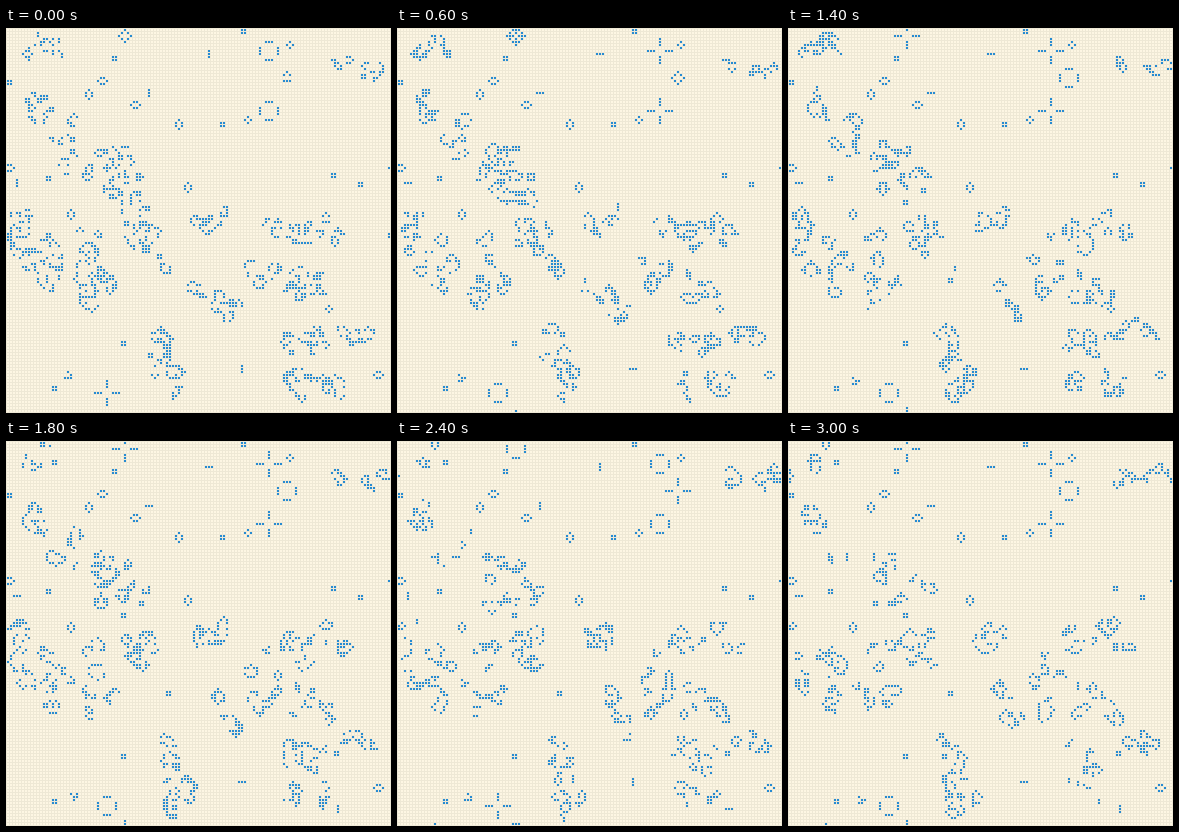
An HTML page with a canvas for the animation above (3.2 s loop, 385 by 385 pixels).

```html
<!DOCTYPE html>
<html lang="en">
<head>
<meta charset="utf-8">
<title>Game of Life</title>
<style>
  html, body { margin: 0; width: 100%; height: 100%; overflow: hidden; background: #fdf6e3; }
  canvas { display: block; width: 385px; height: 385px; }
</style>
</head>
<body>
<canvas id="board" width="385" height="385"></canvas>
<script>
const SIZE = 128, PITCH = 3, EDGE = SIZE * PITCH + 1;
const STEP = 200, STEPS = 16;
const PAPER = '#fdf6e3', LINE = '#eee8d5', LIVE = '#268bd2';
const ctx = document.getElementById('board').getContext('2d');

const wrap = n => (n + SIZE) % SIZE;
const at = (x, y) => wrap(y) * SIZE + wrap(x);

function randomFrom(seed) {
  return () => {
    seed = (Math.imul(seed, 1664525) + 1013904223) >>> 0;
    return seed / 4294967296;
  };
}
const random = randomFrom(71);

function evolve(cells) {
  return cells.map((alive, i) => {
    const x = i % SIZE, y = Math.floor(i / SIZE);
    let sum = -alive;
    for (let dy = -1; dy <= 1; dy++)
      for (let dx = -1; dx <= 1; dx++) sum += cells[at(x + dx, y + dy)];
    return sum === 3 || (alive && sum === 2) ? 1 : 0;
  });
}

// Random cells within r of the line from (x1, y1) to (x2, y2).
function trail(cells, x1, y1, x2, y2, r) {
  const vx = x2 - x1, vy = y2 - y1, len2 = vx * vx + vy * vy;
  for (let y = Math.min(y1, y2) - r; y <= Math.max(y1, y2) + r; y++)
    for (let x = Math.min(x1, x2) - r; x <= Math.max(x1, x2) + r; x++) {
      const k = Math.max(0, Math.min(1, ((x - x1) * vx + (y - y1) * vy) / len2));
      const away = Math.hypot(x - x1 - k * vx, y - y1 - k * vy);
      if (away <= r && random() < 0.36) cells[at(x, y)] = 1;
    }
}

// Writes a small pattern with an empty margin around it.
function stamp(cells, shape, ...spots) {
  const rows = shape.split(' '), gap = 2;
  for (const [x0, y0] of spots)
    for (let y = -gap; y < rows.length + gap; y++)
      for (let x = -gap; x < rows[0].length + gap; x++)
        cells[at(x0 + x, y0 + y)] = rows[y] && rows[y][x] === '#' ? 1 : 0;
}

// Four blinkers around a centre, either pointing at it or across.
function lights(cells, cx, cy, pointing) {
  for (const [dx, dy] of [[1, 0], [-1, 0], [0, 1], [0, -1]])
    for (let k = -1; k <= 1; k++) {
      const out = pointing ? 3 + k : 3, side = pointing ? 0 : k;
      cells[at(cx + dx * out + dy * side, cy + dy * out + dx * side)] = 1;
    }
}

function firstBoard() {
  let cells = new Uint8Array(SIZE * SIZE);
  trail(cells, 10, 26, 22, 35, 5);
  trail(cells, 24, 44, 40, 44, 6);
  trail(cells, 38, 52, 50, 76, 5);
  trail(cells, 26, 72, 30, 87, 6);
  trail(cells, 3, 64, 13, 80, 6);
  trail(cells, 66, 85, 73, 93, 5);
  trail(cells, 84, 80, 102, 85, 5);
  trail(cells, 88, 68, 110, 66, 4);
  trail(cells, 93, 105, 118, 100, 4);
  trail(cells, 97, 117, 111, 118, 4);
  trail(cells, 50, 106, 54, 116, 5);
  trail(cells, 107, 10, 121, 14, 3);
  trail(cells, 8, 6, 19, 5, 3);
  trail(cells, 62, 66, 71, 60, 3);
  for (let i = 0; i < 5; i++) cells = evolve(cells);

  stamp(cells, '## ##', [71, 31], [13, 49], [108, 48], [117, 51], [0, 17],
    [35, 9], [38, 104], [15, 119], [78, 0]);
  stamp(cells, '.##. #..# .##.', [30, 16], [41, 24], [127, 45], [122, 114]);
  stamp(cells, '.#. #.# #.# .#.', [26, 20], [56, 30], [59, 51], [20, 60]);
  stamp(cells, '.#. #.# .#.', [79, 29], [93, 4], [106, 92]);
  stamp(cells, '# # #', [47, 20], [3, 50], [78, 112], [67, 7]);
  stamp(cells, '.#. ..# ###', [19, 114]);
  stamp(cells, '.#. #.# ... ###', [92, 14]);
  stamp(cells, '..#.. .#.#. #...# .#.#. ..#..', [37, 0]);
  lights(cells, 87, 7, false);
  lights(cells, 87, 27, false);
  lights(cells, 33, 121, true);
  return cells;
}

const boards = [firstBoard()];
while (boards.length < STEPS) boards.push(evolve(boards[boards.length - 1]));

function draw(cells) {
  ctx.fillStyle = PAPER;
  ctx.fillRect(0, 0, EDGE, EDGE);
  ctx.fillStyle = LINE;
  for (let p = 0; p < EDGE; p += PITCH) {
    ctx.fillRect(p, 0, 1, EDGE);
    ctx.fillRect(0, p, EDGE, 1);
  }
  ctx.fillStyle = LIVE;
  cells.forEach((alive, i) => {
    if (alive) ctx.fillRect(1 + (i % SIZE) * PITCH, 1 + Math.floor(i / SIZE) * PITCH, 2, 2);
  });
}

const start = performance.now();
let shown = -1;
function tick() {
  const step = Math.floor((performance.now() - start) / STEP) % STEPS;
  if (step !== shown) draw(boards[shown = step]);
  requestAnimationFrame(tick);
}
tick();
</script>
</body>
</html>
```
